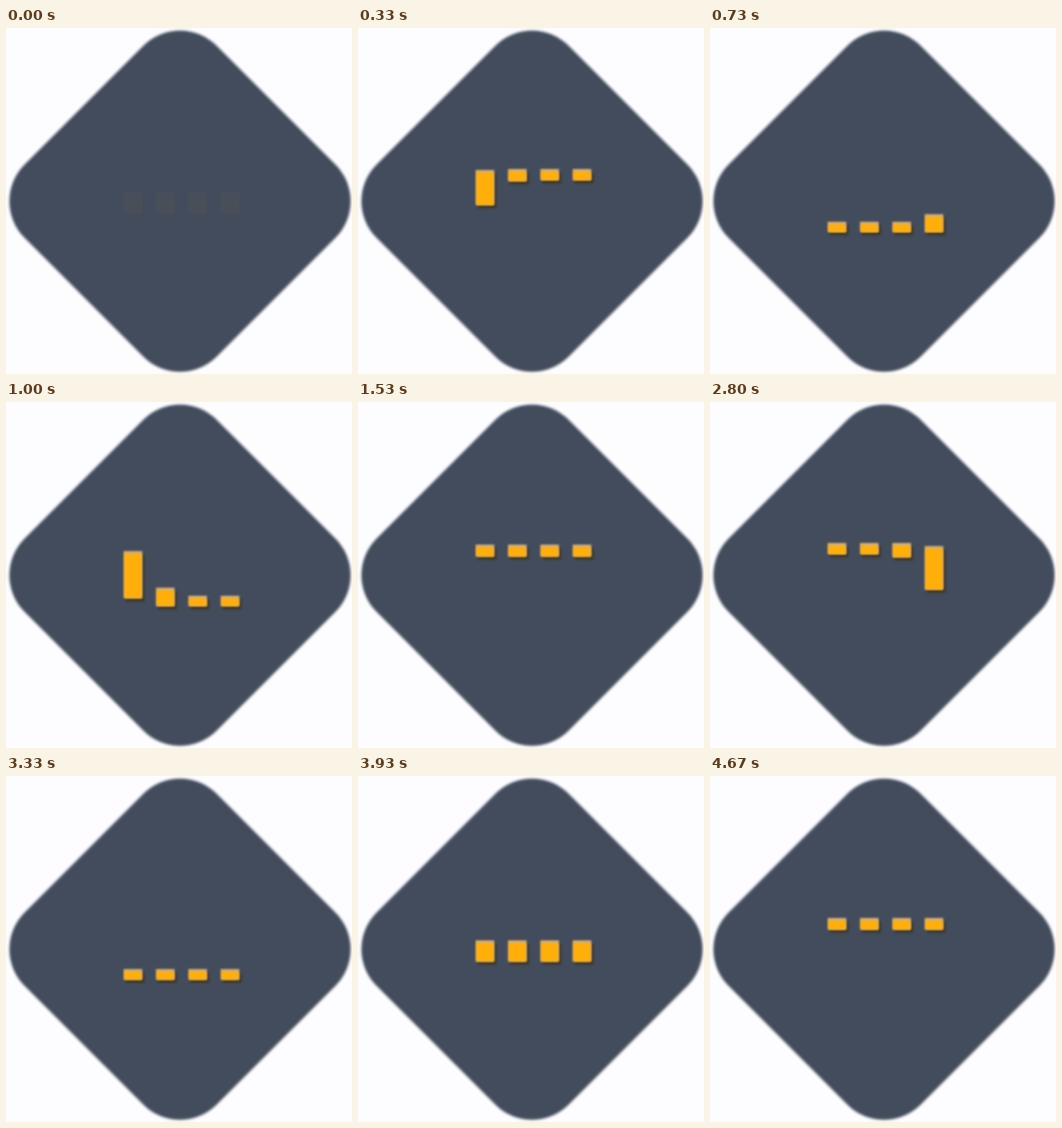
Write an HTML page that moves like this. It is 400 by 400 pixels and loops after 4.74 s.

```html
<!DOCTYPE html>
<html lang="en">
<head>
<meta charset="utf-8">
<title>Loading bars</title>
<style>
  html, body { margin: 0; width: 100%; height: 100%; overflow: hidden; background: #fdfcff; }
  svg { display: block; width: 100vw; height: 100vh; }
</style>
</head>
<body>
<svg viewBox="0 0 400 400">
  <defs>
    <filter id="soft" x="-5%" y="-5%" width="110%" height="110%" color-interpolation-filters="sRGB"><feGaussianBlur stdDeviation="1.8"/></filter>
    <filter id="shade" filterUnits="userSpaceOnUse" x="120" y="140" width="170" height="120" color-interpolation-filters="sRGB"><feGaussianBlur stdDeviation="1.8"/></filter>
    <filter id="edge" filterUnits="userSpaceOnUse" x="120" y="140" width="170" height="120" color-interpolation-filters="sRGB"><feGaussianBlur stdDeviation="1.1"/></filter>
  </defs>
  <rect x="44.2" y="43.2" width="314" height="314" rx="60" fill="#434c5c"
        transform="rotate(45 201.2 200.2)" filter="url(#soft)"/>
  <g id="bars">
    <g id="shadows" fill="#4a3408" filter="url(#shade)"/>
    <g id="lights" fill="#cfb183" filter="url(#edge)"/>
    <g id="faces" fill="#ffae0a" filter="url(#edge)"/>
  </g>
</svg>
<script>
const LOOP = 4740, COUNT = 4, PITCH = 37.4, WIDTH = 21.5, LEFT = 136;
const LAG = 88;
const TOP = [163, 176], MID = [190, 214.5], LOW = [224, 236];

// start, duration, pose, first bar of the wave (null: all together)
const steps = [
  [0, 170, TOP, null],
  [198, 270, LOW, 0],
  [822, 270, TOP, 0],
  [1446, 330, MID, null],
  [2227, 270, TOP, null],
  [2647, 270, LOW, COUNT - 1],
  [3271, 330, MID, null],
  [4460, 270, TOP, null]
];

const $ = id => document.getElementById(id);
const clamp = x => Math.min(1, Math.max(0, x));
const ease = x => x < .5 ? 4 * x ** 3 : 1 - 4 * (1 - x) ** 3;

function addRect(parent) {
  const rect = document.createElementNS('http://www.w3.org/2000/svg', 'rect');
  $(parent).append(rect);
  return rect;
}

function place(rect, x, y, width, height) {
  Object.entries({ x, y, width, height }).forEach(([k, v]) => rect.setAttribute(k, v));
}

const bars = Array.from({ length: COUNT }, () => ['shadows', 'lights', 'faces'].map(addRect));

// The edge facing the direction of travel leads; the other follows.
function edges(i, t) {
  let pose = MID;
  for (const [start, dur, to, first] of steps) {
    if (t < start) break;
    const wave = first !== null;
    const wait = wave ? Math.abs(i - first) * LAG : 0;
    const leader = to === LOW ? 1 : 0;
    pose = pose.map((from, side) => {
      const lag = wave && side !== leader ? LAG : 0;
      return from + (to[side] - from) * ease(clamp((t - start - wait - lag) / dur));
    });
  }
  return pose;
}

function draw(t) {
  bars.forEach(([shadow, light, face], i) => {
    const [y0, y1] = edges(i, t), x = LEFT + i * PITCH, h = y1 - y0;
    place(shadow, x + 2.5, y0 + 4, WIDTH, h - .5);
    place(light, x, y0, WIDTH, h);
    place(face, x + 1.5, y0 + 3.5, WIDTH - 2, h - 3.5);
  });
  $('bars').setAttribute('opacity', .025 + .975 * clamp(t / 140));
}

const began = performance.now();
function tick() {
  draw((performance.now() - began) % LOOP);
  requestAnimationFrame(tick);
}
tick();
</script>
</body>
</html>
```
